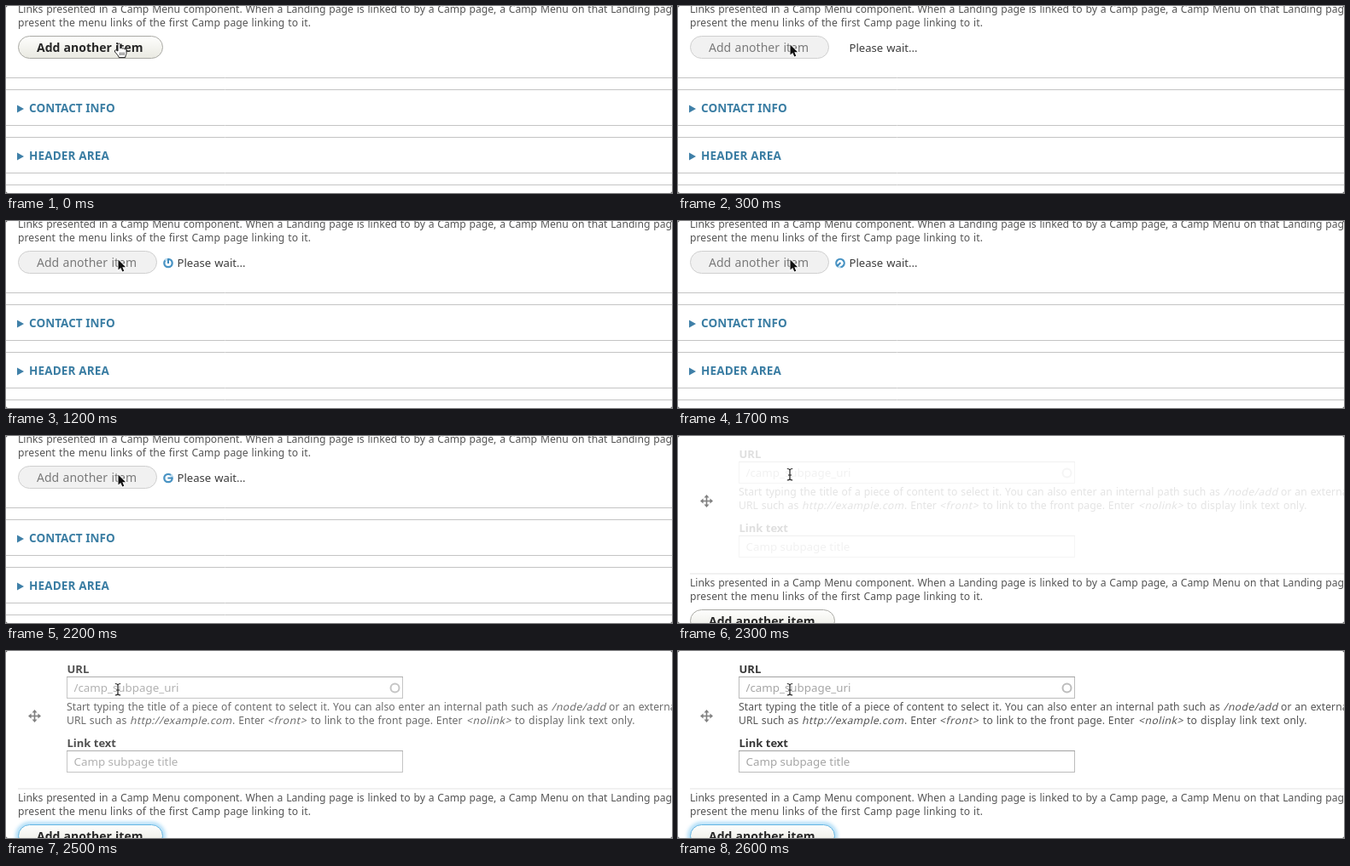
Recreate the animation shown at these times as an HTML page. Size 780 px wide and 220 px high, loop 3000 ms.

```html
<!DOCTYPE html>
<html lang="en">
<head>
<meta charset="utf-8">
<title>Add another item</title>
<style>
  html, body { margin: 0; width: 100%; height: 100%; overflow: hidden; background: #fff; }
  svg { display: block; width: 780px; height: 220px; }
  text { font-family: "Noto Sans", "Open Sans", sans-serif; white-space: pre; }
  .help { font-size: 12.15px; word-spacing: .68px; fill: #555; }
  .label { font-size: 13px; font-weight: 700; fill: #363636; }
  .value { font-size: 13.35px; fill: #a6a6a6; }
  .button { font-size: 14px; font-weight: 700; fill: #262626; word-spacing: .6px; }
  .off { font-size: 14px; fill: #7a7a7a; word-spacing: .8px; }
  .wait { font-size: 13.1px; fill: #3c3c3c; word-spacing: .7px; }
  .section { font-size: 13.5px; font-weight: 700; fill: #3a7da3; }
  .rule { stroke: #c4c4c4; }
  .field { fill: #fff; stroke: #bcbcbc; }
  .shade { stroke: #a2a2a2; }
</style>
</head>
<body>
<svg viewBox="0 0 780 220" xmlns="http://www.w3.org/2000/svg">
  <defs>
    <linearGradient id="face" x2="0" y2="1">
      <stop offset="0" stop-color="#fefefd"/>
      <stop offset="1" stop-color="#e9e9e1"/>
    </linearGradient>
    <filter id="blur" x="-10%" y="-40%" width="120%" height="180%">
      <feGaussianBlur stdDeviation="2.2"/>
    </filter>
    <path id="bar" d="M127.800 38.500q2.700 0 3.200 1.500.5-1.500 3.200-1.500M131 40V50.500M127.800 52q2.700 0 3.200-1.500.5 1.500 3.200 1.500M129 46H133"/>
  </defs>

  <g id="row">
    <g id="fields"></g>
    <path d="M33.5 71V82M28 76.5H39" stroke="#808080" stroke-width="1.6"/>
    <path d="M33.5 69l3 3.6h-6zM33.5 84l3-3.6h-6zM26 76.5l3.6-3v6zM41 76.5l-3.6-3v6z" fill="#808080"/>
    <path d="M14 162H780" stroke="#e2e2e2"/>
  </g>

  <g id="lower">
    <g id="intro"></g>
    <g id="ready">
      <rect id="glow" x="13.5" y="34.5" width="171" height="28" rx="14" fill="none" stroke="#5bb9ef" stroke-width="4" opacity=".6" filter="url(#blur)"/>
      <rect id="edge" x="14.5" y="35.5" width="169" height="26" rx="13" fill="url(#face)"/>
      <text class="button" x="36" y="54">Add another item</text>
    </g>
    <g id="busy">
      <rect x="14.5" y="35.5" width="162" height="26" rx="13" fill="#f1f1f1" stroke="#cfcfcf"/>
      <text class="off" x="36" y="54">Add another item</text>
      <text class="wait" x="200.5" y="54">Please wait...</text>
      <g id="spinner">
        <circle r="4.7" fill="#fff" stroke="#4a94c4" stroke-width="2.3"/>
        <path d="M-3.6-3A4.7 4.7 0 0 1-.8-4.65" fill="none" stroke="#c3dff0" stroke-width="2.3"/>
        <path d="M0-5V.6" stroke="#3f8abd" stroke-width="2"/>
      </g>
    </g>
    <g id="sections"></g>
  </g>

  <g id="hand" transform="translate(126 43)">
    <path d="M5 10V2.6c0-2 2.6-2 2.8 0V7c.4-1.2 2.4-1 2.6.2.6-.9 2.3-.5 2.4.7.8-.7 2.2-.2 2.2 1.2v3.4c0 1.6-1.2 2.6-1.3 5.1H6.2c-.2-2-2.6-4-4.6-6.6C.5 9.3 2.4 8.2 3.5 9.2z" fill="#fff" stroke="#222" stroke-linejoin="round"/>
    <path d="M7.7 11.5v3.5M9.9 11.5v3.5M12.1 11.5v3.5" stroke="#222" stroke-width=".8"/>
  </g>
  <path id="arrow" d="M131.500 45.500V57.600l2.800-2.700 2 4.700 2-.9-2-4.500h3.800z" fill="#111" stroke="#fff" stroke-width="1.600" paint-order="stroke"/>
  <g id="beam" fill="none">
    <use href="#bar" stroke="#fff" stroke-width="2.600"/>
    <use href="#bar" stroke="#222" stroke-width="1.200"/>
  </g>

  <path d="M0 0H2.5Q0 0 0 2.5zM780 0V2.5Q780 0 777.5 0zM0 220V217.5Q0 220 2.5 220zM780 220H777.5Q780 220 780 217.5z" fill="#444"/>
</svg>
<script>
  const LOOP = 3000, STEP = 100;
  const SPIN_START = 1200, REVEAL = 2300, SHIFT = 169;
  const FADE = [.16, .58, .87, 1];
  const $ = id => document.getElementById(id);

  function add(parent, tag, attrs, content = '') {
    const el = document.createElementNS('http://www.w3.org/2000/svg', tag);
    for (const key in attrs) el.setAttribute(key, attrs[key]);
    el.textContent = content;
    $(parent).append(el);
  }

  function write(parent, cls, x, y, content, spacing = 0, slant = 0) {
    add(parent, 'text', {
      class: cls, 'letter-spacing': spacing,
      transform: `translate(${x} ${y}) skewX(${-slant})`
    }, content);
  }

  const help = (x, y, s, spacing = .05) => write('fields', 'help', x, y, s, spacing);
  const slanted = (x, y, s, spacing) => write('fields', 'help', x, y, s, spacing, 13);

  function field(y, label, value) {
    write('fields', 'label', 71.5, y - 5, label);
    add('fields', 'rect', { class: 'field', x: 71.5, y, width: 393, height: 25 });
    add('fields', 'path', { class: 'shade', d: `M71 ${y}H465` });
    write('fields', 'value', 79.5, y + 17.5, value);
  }

  function section(y, title, spacing) {
    add('sections', 'path', { class: 'rule', d: `M0 ${y}H780M0 ${y + 42}H780` });
    add('sections', 'path', { d: `M13 ${y + 18}l8 4.5-8 4.5z`, fill: '#3f80a8' });
    write('sections', 'section', 27, y + 26.5, title, spacing);
  }

  field(30.5, 'URL', '/camp_subpage_uri');
  field(117.5, 'Link text', 'Camp subpage title');
  add('fields', 'circle', { cx: 455.5, cy: 43.5, r: 5, fill: 'none', stroke: '#bcbcbc', 'stroke-width': 2 });

  help(71, 70, 'Start typing the title of a piece of content to select it. You can also enter an internal path such as');
  slanted(639, 70, '/node/add', .4);
  help(706, 70, 'or an external URL');
  help(71, 86, 'URL such as');
  slanted(145, 86, 'http://example.com', .4);
  help(265, 86, '. Enter');
  slanted(306, 86, '<front>', .6);
  help(357, 86, 'to link to the front page. Enter');
  slanted(539, 86, '<nolink>', .5);
  help(596, 86, 'to display link text only.', .18);

  write('intro', 'help', 14, 8, 'Links presented in a Camp Menu component. When a Landing page is linked to by a Camp page, a Camp Menu on that Landing page will');
  write('intro', 'help', 14, 24, 'present the menu links of the first Camp page linking to it.', .06);

  add('sections', 'path', { class: 'rule', d: 'M0 84.5H780M0 210.5H780' });
  section(98.5, 'CONTACT INFO', .05);
  section(154.5, 'HEADER AREA', .15);

  function show(id, on) {
    $(id).style.display = on ? '' : 'none';
  }

  function draw(time) {
    const t = Math.floor(time % LOOP / STEP) * STEP;
    const revealed = t >= REVEAL;
    const busy = t >= 100 && !revealed;
    const focused = t >= REVEAL + STEP;

    show('row', revealed);
    show('ready', !busy);
    show('busy', busy);
    show('glow', focused);
    show('hand', t < 200);
    show('arrow', t >= 200 && !revealed);
    show('beam', revealed);
    show('spinner', t >= SPIN_START);

    $('lower').setAttribute('transform', `translate(0 ${revealed ? SHIFT : 0})`);
    $('edge').setAttribute('stroke', focused ? '#62b4e2' : '#a9a9a4');
    const turn = (t - SPIN_START) / STEP * 45;
    $('spinner').setAttribute('transform', `translate(190 49.5) rotate(${turn})`);
    if (revealed) {
      const i = Math.min((t - REVEAL) / STEP, FADE.length - 1);
      $('fields').setAttribute('opacity', FADE[i]);
    }
  }

  const start = performance.now();
  function tick() {
    draw(performance.now() - start);
    requestAnimationFrame(tick);
  }
  tick();
</script>
</body>
</html>
```
